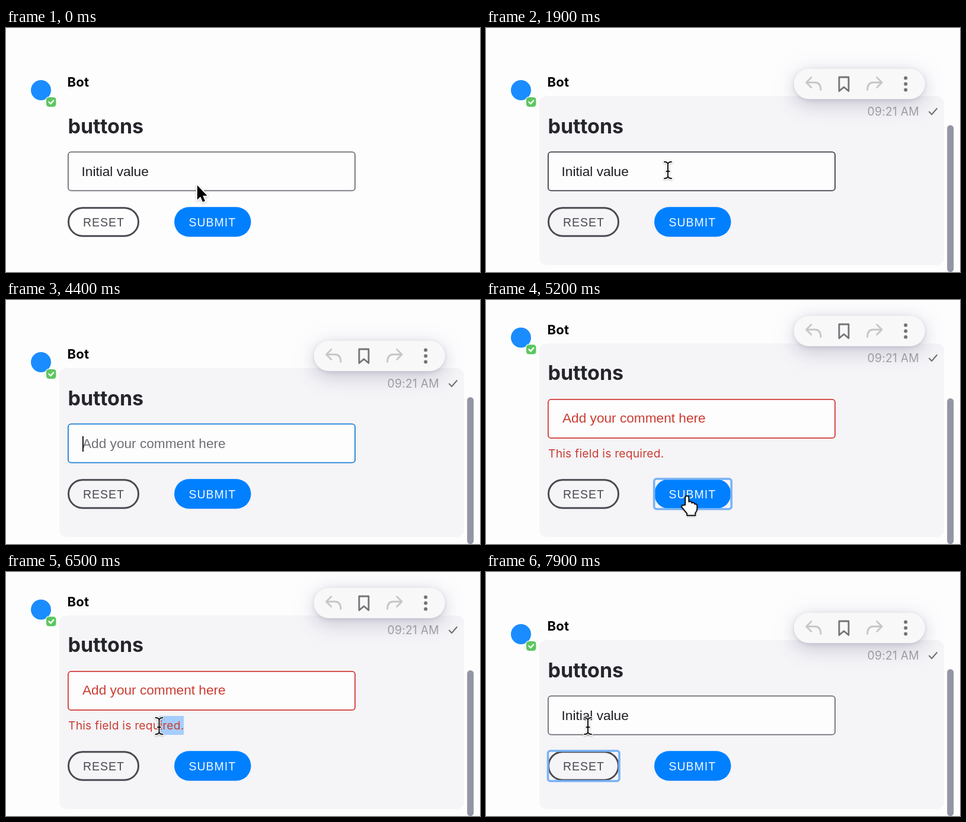
Animation, 800 px wide and 412 px high, one loop 8000 ms. Source, as an HTML page:

```html
<!DOCTYPE html>
<html lang="en">
<head>
<meta charset="utf-8">
<title>Form buttons</title>
<style>
  html, body { margin: 0; width: 100%; height: 100%; overflow: hidden; background: #fefdfe; }
  svg { display: block; width: 100%; height: 100%; }
  text { white-space: pre; }
  .ui { font-family: Inter, "Open Sans", sans-serif; }
  .form { font-family: "Liberation Sans", Arial, sans-serif; }
  .line { fill: none; stroke-linecap: round; stroke-linejoin: round; }
  .caps { font-size: 19.5px; letter-spacing: 1px; }
  .ring { fill: none; stroke: #78b3f6; stroke-width: 3.6; }
  #bar { filter: drop-shadow(0 2px 3px rgba(50, 50, 80, .13)) drop-shadow(0 7px 17px rgba(50, 50, 100, .25)); }
  #cursor { filter: drop-shadow(0 1.5px 1.5px rgba(0, 0, 0, .25)); }
</style>
</head>
<body>
<svg viewBox="0 0 800 412">
  <rect id="panel" x="90" width="683" rx="12" fill="#f5f4f7"/>

  <g data-rise="41.5">
    <circle cx="59" cy="105" r="17" fill="#1a8cff"/>
    <rect x="67" y="116" width="18" height="17.5" rx="5" fill="#fefdfe"/>
    <rect x="68" y="117" width="16.5" height="16" rx="4.5" fill="#5bc75f"/>
    <path class="line" d="M72.5 125l2.8 3 5-5.6" stroke="#fff" stroke-width="2.4"/>
    <text class="ui" x="103.5" y="99" font-size="22" font-weight="700" letter-spacing=".2">Bot</text>
  </g>
  <text class="ui" data-rise="43" x="104.5" y="178" font-size="34" font-weight="700"
        letter-spacing="-.05" fill="#25262b">buttons</text>

  <g data-rise="41.5">
    <rect id="input" x="104.9" y="209.4" width="484.2" height="65.3" rx="5" fill="#fefdfe" stroke-width="1.8"/>
  </g>
  <g data-rise="43">
    <text id="value" class="form" y="250" font-size="22.65"></text>
    <rect id="caret" y="230" width="1.8" height="26"/>
  </g>

  <g id="error">
    <rect id="selection" y="243" height="32" fill="#a6cdfb"/>
    <text class="ui" x="105" y="266" font-size="19.3" letter-spacing=".2" fill="#cb3d33">This field is required.</text>
  </g>

  <rect x="105.5" y="303.7" width="118" height="47.5" rx="23.75" fill="none" stroke="#4a4b52" stroke-width="3"/>
  <text class="form caps" x="130" y="335" fill="#4a4b52">RESET</text>
  <rect x="284" y="302.3" width="129.5" height="50.2" rx="25" fill="#0080ff"/>
  <text class="form caps" x="308.5" y="335" fill="#f4f8ff">SUBMIT</text>
  <rect id="resetRing" class="ring" x="104.5" y="302" width="120.5" height="51" rx="4"/>
  <rect id="submitRing" class="ring" x="283.7" y="302" width="130.5" height="51" rx="4"/>

  <g id="hover">
    <rect id="scroll" x="778.3" width="11" rx="5.5" fill="#9296a4"/>
    <g data-rise="43">
      <text class="ui" x="643.5" y="148" font-size="19.5" letter-spacing=".15" fill="#a4a3a8">09:21 AM</text>
      <path class="line" d="M748 141.500l4.300 4.500 8.700-10" stroke="#707075" stroke-width="2"/>
    </g>
    <g data-rise="42">
      <rect id="bar" x="519.5" y="68.7" width="221.5" height="51.3" rx="25.65" fill="#f8f8f9"/>
      <g class="line" stroke-width="2.8">
        <path id="reply" d="M549 83.500l-8.500 8.500 8.500 8.500M541 92H555Q565 92 565 104.500" stroke="#c6c6c9"/>
        <use href="#reply" transform="matrix(-1 0 0 1 1208.7 0)"/>
        <path d="M596 83H612V106.500L604 99.700 596 106.500Z" stroke="#737378"/>
      </g>
      <g fill="#737378">
        <circle cx="708.3" cy="84.5" r="3"/><circle cx="708.3" cy="94.5" r="3"/><circle cx="708.3" cy="104.5" r="3"/>
      </g>
    </g>
  </g>

  <g id="cursor">
    <path id="arrow" d="M.8 1.500V26L6.200 20.800 10 29.800 14 28 10.200 19.200H17.500Z"
          stroke="#fff" stroke-width="4" stroke-linejoin="round" paint-order="stroke"/>
    <g id="beam" class="line">
      <path id="beamHalo" d="M-6-14Q-1-14 0-10.500Q1-14 6-14M0-10.500V10.500M-6 14Q-1 14 0 10.500Q1 14 6 14M-2.500 2H2.500"
            stroke="#fff" stroke-width="4.5"/>
      <path d="M-6-14Q-1-14 0-10.500Q1-14 6-14M0-10.500V10.500M-6 14Q-1 14 0 10.500Q1 14 6 14M-2.500 2H2.500"
            stroke="#111" stroke-width="2"/>
    </g>
    <path id="hand" d="M-3 13V1Q-3-2 0-2T3 1V8Q7 6 8 10Q12 8 13 12Q17 11 17 15V20Q17 23 14 27V31H0V28L-9 17Q-10 13-6 14Z"
          fill="#fff" stroke="#111" stroke-width="2" stroke-linejoin="round"/>
  </g>
</svg>
<script>
const DURATION = 8000, STEP = 100;
const INITIAL = "Initial value", PLACEHOLDER = "Add your comment here";
const FOCUS = 2000, ERASE = 2300, REPEAT = 2800, SUBMIT = 5100, SELECT = 6200, RESET = 7600;

// time, x, y of the pointer
const TRACK = [
  [0, 322, 264], [200, 349, 225], [500, 349, 225], [800, 307, 240], [4600, 307, 240],
  [5000, 340, 332], [5500, 338, 334], [5700, 291, 286], [6100, 300, 260], [6200, 300, 260],
  [6800, 217, 260], [7200, 204, 275], [7500, 168, 338], [7600, 168, 338], [7900, 172, 260], [8000, 172, 260]
];

const $ = id => document.getElementById(id);
const risers = document.querySelectorAll("[data-rise]");
const clamp = v => Math.min(1, Math.max(0, v));
const show = (id, on) => $(id).setAttribute("visibility", on ? "inherit" : "hidden");
const set = (id, attrs) => {
  for (const name in attrs) $(id).setAttribute(name, attrs[name]);
};

function pointerAt(t) {
  const i = TRACK.findIndex((p, k) => k && t <= p[0]);
  const [t0, x0, y0] = TRACK[i - 1], [t1, x1, y1] = TRACK[i];
  const u = (t - t0) / (t1 - t0), e = u * u * (3 - 2 * u);
  return [x0 + (x1 - x0) * e, y0 + (y1 - y0) * e];
}

function pointerShape(t, x, y, failed) {
  if (t < 500) return "arrow";
  const within = (l, top, r, b) => x > l && x < r && y > top && y < b;
  if (within(104, 302, 225, 353) || within(284, 302, 414, 353)) return "hand";
  const overText = failed
    ? within(104, 168, 590, 234) || within(104, 243, 301, 274)
    : within(104, 209, 590, 275);
  return overText ? "beam" : "arrow";
}

function erasedCount(t) {
  if (t < ERASE || t >= RESET) return 0;
  return t < REPEAT ? 1 : 2 + Math.floor((t - REPEAT) / 85);
}

function draw(t) {
  const failed = t >= SUBMIT && t < RESET;
  const focused = t >= FOCUS && t < SUBMIT;
  const [x, y] = pointerAt(t);

  for (const el of risers)
    el.setAttribute("transform", `translate(0 ${failed ? -el.dataset.rise : 0})`);
  const top = failed ? 73.5 : 115;
  set("panel", { y: top, height: 400 - top, opacity: clamp((t - 400) / 200) });
  set("hover", { opacity: clamp((t - 600) / 600) });
  const thumb = failed ? 166 : 164;
  set("scroll", { y: thumb, height: 412 - thumb });

  const border = failed ? "#d23b33" : focused ? "#1b80d3" : t >= 500 && t < FOCUS ? "#3d4047" : "#6c7076";
  set("input", { stroke: border });
  const value = INITIAL.slice(0, Math.max(0, INITIAL.length - erasedCount(t)));
  $("value").textContent = value || PLACEHOLDER;
  set("value", {
    x: focused || failed ? 129 : 127.5,
    fill: failed ? "#cb3d33" : value ? "#1d1e22" : "#6e6f75"
  });
  set("caret", { x: 129 + (value ? $("value").getComputedTextLength() + 1 : 0) });
  show("caret", focused && Math.floor(t / 500) % 2 === 0);

  show("error", failed);
  const left = t >= 6800 ? 216 : Math.max(216, x);
  set("selection", { x: left, width: t >= SELECT ? Math.max(0, 300 - left) : 0 });
  show("submitRing", t >= SUBMIT && t < SELECT);
  show("resetRing", t >= RESET);

  const shape = pointerShape(t, x, y, failed);
  const typing = t >= ERASE && t < 4600;
  for (const id of ["arrow", "beam", "hand"]) show(id, id === shape && !typing);
  set("cursor", { transform: `translate(${x} ${y})` });
}

function tick() {
  const t = performance.now() % DURATION;
  draw(Math.floor(t / STEP) * STEP);
  requestAnimationFrame(tick);
}
tick();
</script>
</body>
</html>
```
